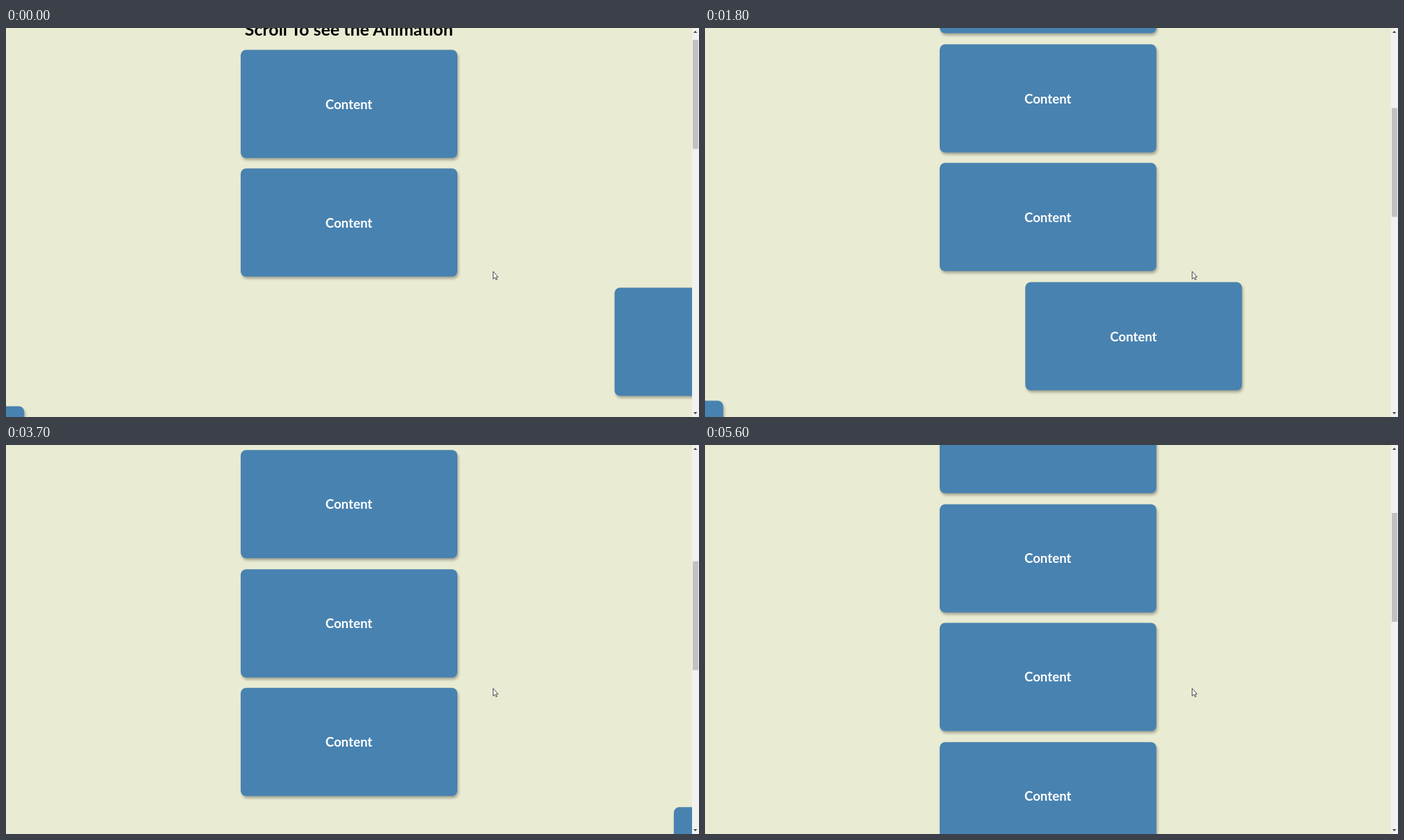
An HTML page that plays this animation: 998x561 px, repeating every 6000 ms.

```html
<!DOCTYPE html>
<html lang="en">
<head>
<meta charset="utf-8">
<title>Scroll Animation</title>
<style>
  html, body { margin: 0; width: 100%; height: 100%; overflow: hidden; }
  #stage {
    position: relative; width: 998px; height: 561px; overflow: hidden;
    background: #e9ecd2; font-family: Lato, sans-serif;
  }
  #view { position: absolute; inset: 0 10.5px 0 0; overflow: hidden; }
  #page { position: absolute; inset: 0; }
  h1 {
    position: absolute; top: 7.8px; width: 100%; margin: 0;
    font-size: 24.95px; line-height: 30px; text-align: center; color: #000;
  }
  .box {
    position: absolute; left: 337.8px; width: 311.9px; height: 155.9px;
    display: flex; align-items: center; justify-content: center;
    border-radius: 7.8px; background: #4882b0; color: #fff;
    box-shadow: 1.6px 3.1px 3.9px rgba(0, 0, 0, .3);
    font-size: 18.71px; font-weight: 700;
  }
  #bar { position: absolute; right: 0; top: 0; width: 10.5px; height: 100%; background: #f1f1f1; }
  #thumb { position: absolute; left: 1.5px; top: 10.7px; width: 8px; height: 157px; background: #c1c1c1; }
  svg { position: absolute; inset: 0; }
</style>
</head>
<body>
<div id="stage">
  <div id="view"><div id="page"><h1>Scroll To see the Animation</h1></div></div>
  <div id="bar"><div id="thumb"></div></div>
  <svg width="998" height="561">
    <path d="M990 7l2.7-3 2.7 3zM990 554l2.7 3 2.7-3z" fill="#404040"/>
    <path d="M701.5 351v11l2.5-2.3 1.7 3.5 1.6-.7-1.6-3.4h3z" fill="#fff" stroke="#222" stroke-width=".8"/>
  </svg>
</div>
<script>
  const LOOP = 6000, STEP = 100, LAST = 5600;
  const TOP = 53.75, PITCH = 171.5, TICK = 187.1, AWAY = 623.8, SLIDE = 600;
  const page = document.getElementById('page');
  const thumb = document.getElementById('thumb');

  function bezier(x1, y1, x2, y2) {
    const at = (u, a, b) => 3 * (1 - u) ** 2 * u * a + 3 * (1 - u) * u * u * b + u ** 3;
    return x => {
      if (x <= 0) return 0;
      if (x >= 1) return 1;
      let lo = 0, hi = 1;
      for (let i = 0; i < 30; i++) {
        const mid = (lo + hi) / 2;
        if (at(mid, x1, x2) < x) lo = mid; else hi = mid;
      }
      return at(lo, y1, y2);
    };
  }
  const ease = bezier(.25, .1, .25, 1);
  const inOut = bezier(.42, 0, .58, 1);
  const lateInOut = bezier(.85, 0, .85, 1);

  // Wheel moves: one tick down or up each
  const moves = [
    { start: -181, time: 750, dir: 1, curve: inOut },
    { start: 1131, time: 700, dir: 1, curve: inOut },
    { start: 2378, time: 625, dir: 1, curve: inOut },
    { start: 3649.5, time: 650, dir: -1, curve: lateInOut },
    { start: 5050, time: 828.4, dir: -1, curve: lateInOut }
  ];

  // When each box slides in and, if it does, out again
  const slides = [
    { show: -SLIDE }, { show: -SLIDE }, { show: -75 }, { show: 300 },
    { show: 1500 }, { show: 2700, hide: 4200 }, { show: Infinity }
  ];

  const boxes = slides.map((_, i) => {
    const box = document.createElement('div');
    box.className = 'box';
    box.textContent = 'Content';
    box.style.top = TOP + i * PITCH + 'px';
    page.append(box);
    return box;
  });

  function draw(t) {
    const scroll = moves.reduce((sum, m) =>
      sum + m.dir * TICK * m.curve((t - m.start) / m.time), 0);
    page.style.transform = `translateY(${-scroll}px)`;
    thumb.style.transform = `translateY(${scroll * .2794}px)`;
    slides.forEach(({ show, hide = Infinity }, i) => {
      const away = 1 - ease((t - show) / SLIDE) + ease((t - hide) / SLIDE);
      const side = i % 2 ? -1 : 1;
      boxes[i].style.transform = `translateX(${side * AWAY * away}px)`;
    });
  }

  const begin = performance.now();
  function tick() {
    const t = (performance.now() - begin + 1) % LOOP;
    draw(Math.min(LAST, Math.floor(t / STEP) * STEP));
    requestAnimationFrame(tick);
  }
  tick();
</script>
</body>
</html>
```
